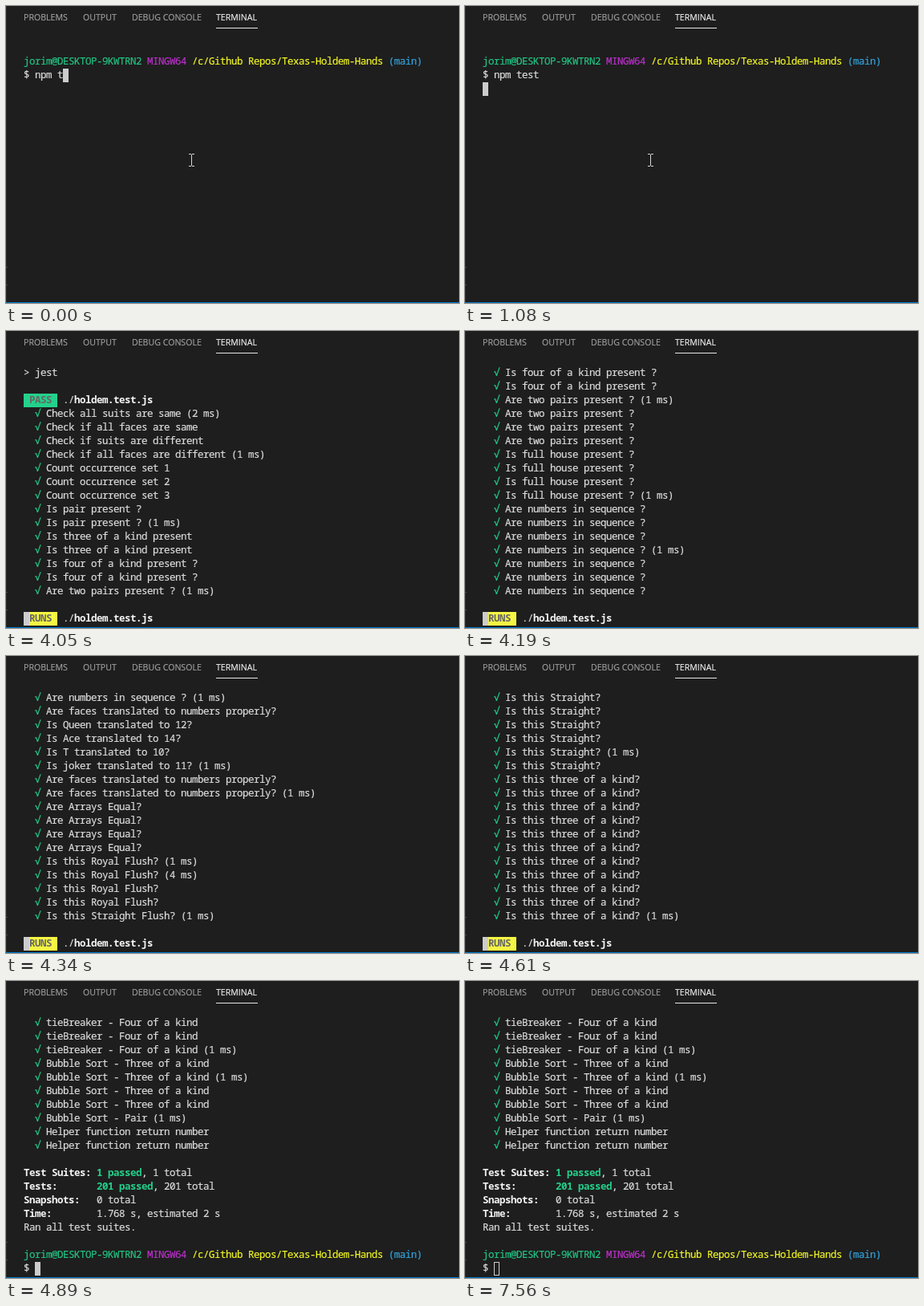
These frames come from a looping animation (565 px wide and 370 px high, 7660 ms). An HTML page:

```html
<!DOCTYPE html>
<html lang="en">
<head>
<meta charset="utf-8">
<title>Terminal test run</title>
<style>
  html, body { margin: 0; width: 100%; height: 100%; overflow: hidden; background: #1e1e1e; }
  #stage { position: relative; width: 565px; height: 370px; overflow: hidden; background: #1e1e1e; }
  #stage div, #stage svg { position: absolute; }
  .tab { top: 6px; font: 10.6px/16px "Open Sans", sans-serif; color: #a0a0a0; white-space: pre;
         -webkit-text-stroke: .15px; }
  .tab.active { color: #f0f0f0; }
  .screen { left: 0; top: 0; width: 565px; height: 370px; visibility: hidden; }
  .row { left: 22px; white-space: pre; color: #dcdcdc;
         font: 12.5px/17px "Noto Sans Mono", monospace; letter-spacing: calc(7px - 1ch);
         -webkit-text-stroke: .2px; }
  .row i { display: inline-block; width: 7px; font-style: normal; color: #23d18b; }
  .row b { font-weight: 700; color: #f4f4f4; -webkit-text-stroke: 0; }
  .row .badge { color: #666; }
  .row .passed { color: #23d18b; }
  .row .dim { color: #858585; }
  .user { color: #23c383; }
  .system { color: #bc30cc; }
  .path { color: #f0f525; }
  .branch { color: #33a3dc; }
  .hollow { box-sizing: border-box; border: 1px solid #ccc; }
</style>
</head>
<body>
<div id="stage">
  <div style="left:0;top:0;width:1px;height:370px;background:#2c2c2c"></div>
  <div style="left:0;top:325px;width:2px;height:1px;background:#4a4a4a"></div>
  <div style="left:0;top:347px;width:2px;height:1px;background:#4a4a4a"></div>
  <div style="left:0;top:369px;width:565px;height:1px;background:#007acc"></div>
  <div class="tab" style="left:22px">PROBLEMS</div>
  <div class="tab" style="left:96px">OUTPUT</div>
  <div class="tab" style="left:157px">DEBUG CONSOLE</div>
  <div class="tab active" style="left:262px">TERMINAL</div>
  <div style="left:262px;top:27px;width:52px;height:1px;background:#e7e7e7"></div>
</div>
<script>
const LOOP = 7660, CELL = 7, LINE = 17, LEFT = 22, TOP = 44;
const YELLOW = '#f5f543', GREEN = '#23d18b', CURSOR = '#ccc';
const stage = document.getElementById('stage');

const span = (cls, text) => `<span class="${cls}">${text}</span>`;
const bold = (text, cls = '') => `<b class="${cls}">${text}</b>`;
const times = (n, text) => Array(n).fill(text);
const check = text => `  <i>√</i> ${text}`;

// A block is a filled cell range: column, row, width in cells.
const block = (col, row, cells, color) =>
  `<div style="left:${LEFT + col * CELL}px;top:${TOP + row * LINE}px;` +
  `width:${cells * CELL}px;height:${LINE}px;background:${color}"></div>`;
const solid = (col, row) => block(col, row, 1, CURSOR);
const hollow = (col, row) =>
  block(col, row, 1, 'none').replace('<div', '<div class="hollow"');
const pointer = (x, y) =>
  `<svg style="left:${x}px;top:${y}px" width="8" height="16" fill="none" stroke="#d8d8d8">` +
  '<path d="M0 .5H3M4 .5H7M0 15.5H3M4 15.5H7M3.5 1V15"/></svg>';

const prompt = [
  span('user', 'jorim@DESKTOP-9KWTRN2'), span('system', 'MINGW64'),
  span('path', '/c/Github Repos/Texas-Holdem-Hands'), span('branch', '(main)')
].join(' ');
const status = word => ` ${bold(word, 'badge')}  ./${bold('holdem.test.js')}`;

const typed = text => ['', prompt, '$ ' + text];
const started = [...typed('npm test'), '',
  '&gt; Texas-Holdem-Hands@1.0.0 test C:\\Github Repos\\Texas-Holdem-Hands',
  '&gt; jest', ''];
const running = tests => [...tests.map(check), '', status('RUNS')];
const runningMarks = block(0, 18, 6, YELLOW) + solid(0, 18);

const suits = ['Check all suits are same (2 ms)', 'Check if all faces are same',
  'Check if suits are different', 'Check if all faces are different (1 ms)',
  'Count occurrence set 1', 'Count occurrence set 2', 'Count occurrence set 3',
  'Is pair present ?', 'Is pair present ? (1 ms)',
  ...times(2, 'Is three of a kind present'),
  ...times(2, 'Is four of a kind present ?'), 'Are two pairs present ? (1 ms)'];

const pairs = [...times(2, 'Is four of a kind present ?'),
  'Are two pairs present ? (1 ms)', ...times(3, 'Are two pairs present ?'),
  ...times(3, 'Is full house present ?'), 'Is full house present ? (1 ms)',
  ...times(3, 'Are numbers in sequence ?'), 'Are numbers in sequence ? (1 ms)',
  ...times(3, 'Are numbers in sequence ?')];

const translated = 'Are faces translated to numbers properly?';
const faces = ['Are numbers in sequence ? (1 ms)', translated,
  'Is Queen translated to 12?', 'Is Ace translated to 14?',
  'Is T translated to 10?', 'Is joker translated to 11? (1 ms)',
  translated, translated + ' (1 ms)', ...times(4, 'Are Arrays Equal?'),
  'Is this Royal Flush? (1 ms)', 'Is this Royal Flush? (4 ms)',
  ...times(2, 'Is this Royal Flush?'), 'Is this Straight Flush? (1 ms)'];

const houses = [...times(4, 'Is this four of a kind?'),
  'Is this four of a kind? (1 ms)', ...times(5, 'Is this Full House?'),
  'Is this Full House? (1 ms)', ...times(5, 'Is this Flush?'),
  'Is this Flush? (1 ms)'];

const straights = [...times(4, 'Is this Straight?'), 'Is this Straight? (1 ms)',
  'Is this Straight?', ...times(10, 'Is this three of a kind?'),
  'Is this three of a kind? (1 ms)'];

const ties = [...times(4, 'Is this two pairs?'), 'Is this two pairs? (1 ms)',
  ...times(4, 'Is this pair?'), 'Is this pair? (1 ms)',
  'tieBreaker - Both hands have the same rank and kickers? (1 ms)',
  ...times(3, 'tieBreaker - High card'), ...times(3, 'tieBreaker - Four of a kind')];

const sorted = 'Bubble Sort - Three of a kind';
const summary = [
  ...[...times(2, 'tieBreaker - Four of a kind'), 'tieBreaker - Four of a kind (1 ms)',
    sorted, sorted + ' (1 ms)', sorted, sorted, 'Bubble Sort - Pair (1 ms)',
    ...times(2, 'Helper function return number')].map(check),
  '',
  `${bold('Test Suites:')} ${bold('1 passed', 'passed')}, 1 total`,
  `${bold('Tests:')}       ${bold('201 passed', 'passed')}, 201 total`,
  `${bold('Snapshots:')}   0 total`,
  `${bold('Time:')}        1.768 s, estimated 2 s`,
  'Ran all test suites.', '', prompt, '$'];

const restingPointer = pointer(228, 184);

// Each step: start time, text rows, marks behind the text.
const steps = [
  [0, typed('npm t'), solid(7, 2) + restingPointer],
  [150, typed('npm te'), solid(8, 2) + restingPointer],
  [270, typed('npm test'), solid(10, 2) + restingPointer],
  [1080, typed('npm test'), solid(0, 3) + restingPointer],
  [1810, started, solid(0, 7) + restingPointer],
  [2390, [...started, bold('Determining test suites to run...', 'dim')],
    solid(33, 7) + pointer(455, 223)],
  [2510, [...started, '', status('RUNS')], block(0, 8, 6, YELLOW) + solid(0, 9)],
  [4050, ['&gt; jest', '', status('PASS'), ...running(suits)],
    block(0, 2, 6, GREEN) + runningMarks],
  [4190, running(pairs), runningMarks],
  [4340, running(faces), runningMarks],
  [4460, running(houses), runningMarks],
  [4610, running(straights), runningMarks],
  [4740, running(ties), runningMarks],
  [4890, summary, solid(2, 18)],
  [7560, summary, hollow(2, 18)]
];

const screens = steps.map(([, rows, marks]) => {
  const screen = document.createElement('div');
  screen.className = 'screen';
  screen.innerHTML = marks + rows.map((text, row) =>
    `<div class="row" style="top:${TOP - 1 + row * LINE}px">${text}</div>`).join('');
  return stage.appendChild(screen);
});

const origin = performance.now();
let shown = -1;
function draw() {
  const time = (performance.now() - origin) % LOOP;
  const current = steps.filter(([start]) => start <= time).length - 1;
  if (current !== shown) {
    screens.forEach((screen, i) => {
      screen.style.visibility = i === current ? 'visible' : 'hidden';
    });
    shown = current;
  }
  requestAnimationFrame(draw);
}
draw();
</script>
</body>
</html>
```
